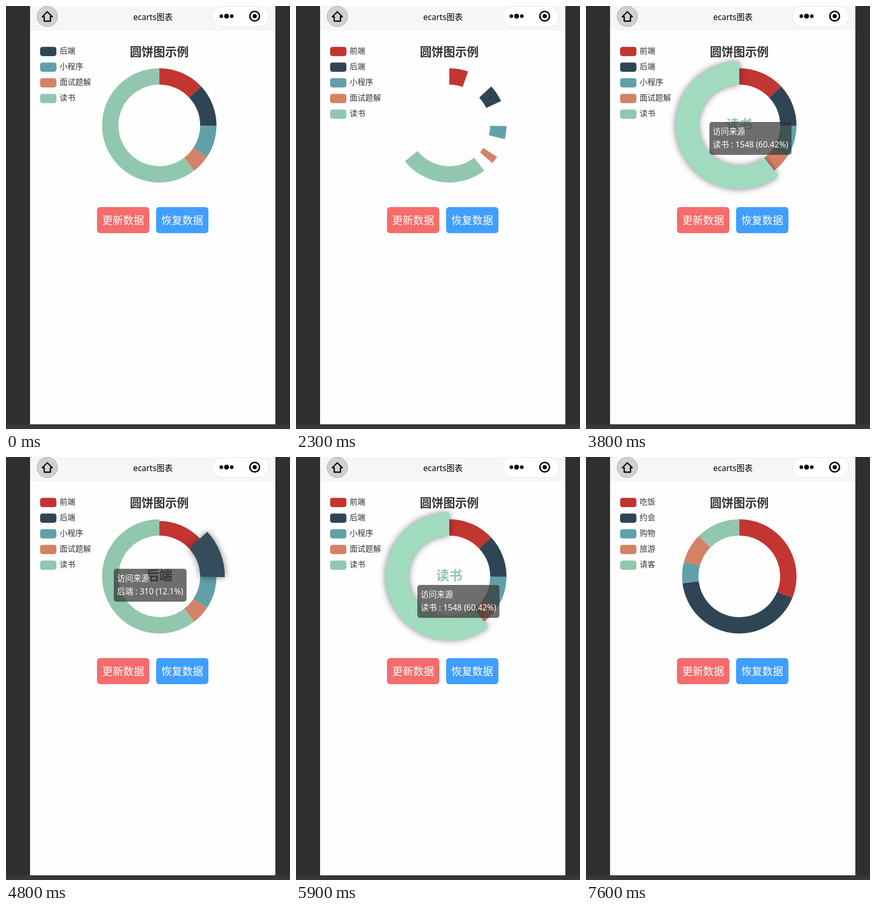
Animation of 543 by 810 pixels, one loop 8000 ms. Source, as an HTML page:

```html
<!DOCTYPE html>
<html lang="zh">
<head>
<meta charset="utf-8">
<title>圆饼图示例</title>
<style>
  html, body { margin: 0; width: 100%; height: 100%; overflow: hidden; background: #2f2f2f; }
  svg { display: block; }
  text { font-family: "Noto Sans", "Noto Sans CJK SC", "Noto Sans CJK", sans-serif; }
  .mid { text-anchor: middle; }
  .lit { filter: drop-shadow(0 0 6.25px rgba(0, 0, 0, .5)); }
</style>
</head>
<body>
<svg id="stage" width="543" height="810" viewBox="0 0 543 810">
  <rect width="543" height="810" fill="#2f2f2f"/>
  <rect y="801" width="543" height="9" fill="#383838"/>
  <rect x="46" width="469" height="801" fill="#fefefe"/>
  <rect x="46" width="469" height="47" fill="#f6f6f6"/>

  <circle cx="79" cy="20" r="19.5" fill="#d0d0d0" stroke="#a9a9a9"/>
  <path d="M69.5 20.5 L79 11 L88.5 20.5 H85 V29 H73 V20.5 Z" fill="none" stroke="#000" stroke-width="2.4" stroke-linejoin="round"/>
  <text class="mid" x="281" y="27" font-size="15.5">ecarts图表</text>
  <rect x="394.5" y=".5" width="108" height="39" rx="19.5" fill="#fff" stroke="#e4e4e4"/>
  <circle cx="411.7" cy="19.5" r="3.4"/>
  <circle cx="421.7" cy="19.5" r="4.7"/>
  <circle cx="431.7" cy="19.5" r="3.4"/>
  <circle cx="475.5" cy="19.5" r="9.2" fill="none" stroke="#000" stroke-width="2.8"/>
  <circle cx="475.5" cy="19.5" r="4"/>

  <text class="mid" x="293" y="95.5" font-size="22.5" font-weight="700" fill="#333">圆饼图示例</text>
  <g id="legend" font-size="15" fill="#333"></g>
  <g id="ring"></g>
  <text id="label" class="mid" x="293" y="236" font-size="25" font-weight="700"></text>
  <g id="tip" font-size="15.5" fill="#fff">
    <rect height="63" rx="5" fill="#323232" fill-opacity=".7"/>
    <text x="6.2" y="23.5">访问来源</text>
    <text x="6.2" y="48.5"></text>
  </g>

  <g class="mid" font-size="20" fill="#fff">
    <rect x="174" y="385" width="100" height="50" rx="6" fill="#f56c6c"/>
    <text x="224" y="418.3">更新数据</text>
    <rect x="287" y="385" width="100" height="50" rx="6" fill="#409eff"/>
    <text x="337" y="418.3">恢复数据</text>
  </g>
</svg>
<script>
const LOOP = 8000, STEP = 100, LAG = 48, EASE_MS = 300;
const CX = 293.1, CY = 228.6, INNER = 78.1, OUTER = 109.4, GROW = 12.5;
const COLORS = [[194, 53, 49], [47, 69, 84], [97, 160, 168], [212, 130, 101], [145, 199, 174]];

const study = { names: ['前端', '后端', '小程序', '面试题解', '读书'], values: [335, 310, 234, 135, 1548] };
const leisure = { names: ['吃饭', '约会', '购物', '旅游', '请客'], values: [112.2, 150.9, 21.8, 30.1, 45] };

// Data shown from a given time; firstRow drops leading legend rows.
const datasets = [
  { at: -LOOP, data: study, firstRow: 1 },
  { at: 500, data: leisure, firstRow: 0 },
  { at: 2300, data: study, firstRow: 0 },
  { at: 7300, data: leisure, firstRow: 0 }
];

// Highlighted slice and tooltip corner; "right" aligns the tooltip to the page edge.
const hovers = [
  { at: -LOOP, slice: -1 },
  { at: 3800, slice: 4, x: 236, y: 222, extra: 100 },
  { at: 4300, slice: 0, right: 515, y: 173 },
  { at: 4800, slice: 1, x: 206, y: 214 },
  { at: 5200, slice: 2, x: 208, y: 282 },
  { at: 5700, slice: 4, x: 232, y: 245 },
  { at: 7300, slice: -1 }
];

const $ = id => document.getElementById(id);
const rgb = (c, k = 1) => `rgb(${c.map(v => Math.round(v * k))})`;
const sum = list => list.reduce((a, b) => a + b, 0);
const lastIndex = (list, t) => list.filter(e => e.at <= t).length - 1;
const progress = (e, t) => Math.min(1, (t - e.at + LAG + (e.extra || 0)) / EASE_MS);
const cubicOut = k => 1 - (1 - k) ** 3;
const elasticOut = k => k >= 1 ? 1 : 2 ** (-10 * k) * Math.sin((k - .1) * 5 * Math.PI) + 1;

function add(parent, tag, attrs) {
  const el = document.createElementNS('http://www.w3.org/2000/svg', tag);
  for (const key in attrs) el.setAttribute(key, attrs[key]);
  return parent.appendChild(el);
}

function sector(a0, a1, r) {
  const p = (a, d) => `${(CX + d * Math.sin(a)).toFixed(2)} ${(CY - d * Math.cos(a)).toFixed(2)}`;
  const big = a1 - a0 > Math.PI ? 1 : 0;
  return `M${p(a0, r)}A${r} ${r} 0 ${big} 1 ${p(a1, r)}L${p(a1, INNER)}A${INNER} ${INNER} 0 ${big} 0 ${p(a0, INNER)}Z`;
}

function drawLegend({ data, firstRow }) {
  $('legend').replaceChildren();
  data.names.slice(firstRow).forEach((name, row) => {
    const y = 78.3 + row * 30;
    add($('legend'), 'rect', { x: 65.2, y, width: 31.2, height: 17.6, rx: 4.4, fill: rgb(COLORS[row + firstRow]) });
    add($('legend'), 'text', { x: 102.4, y: y + 13.1 }).textContent = name;
  });
}

function drawRing(data, grown, lit, previous, pop) {
  const total = sum(data.values);
  $('ring').replaceChildren();
  let start = 0, top = null;
  data.values.forEach((value, i) => {
    const sweep = value / total * 2 * Math.PI;
    const swell = i === lit ? pop : i === previous ? 1 - pop : 0;
    const path = add($('ring'), 'path', {
      d: sector(start, start + sweep * grown, OUTER + GROW * swell),
      fill: rgb(COLORS[i], i === lit ? 1.1 : 1)
    });
    if (i === lit) {
      path.setAttribute('class', 'lit');
      top = path;
    }
    start += sweep;
  });
  if (top) $('ring').append(top);
}

function drawTip(data, hover) {
  const shown = hover.slice >= 0;
  $('tip').style.display = $('label').style.display = shown ? '' : 'none';
  if (!shown) return;
  const name = data.names[hover.slice], value = data.values[hover.slice];
  const percent = +(value / sum(data.values) * 100).toFixed(2);
  const [box, , line] = $('tip').children;
  line.textContent = `${name} : ${value} (${percent}%)`;
  const width = line.getComputedTextLength() + 12.4;
  box.setAttribute('width', width);
  $('tip').setAttribute('transform', `translate(${hover.x ?? hover.right - width} ${hover.y})`);
  $('label').textContent = name;
  $('label').setAttribute('fill', rgb(COLORS[hover.slice]));
}

function draw(t) {
  const set = datasets[lastIndex(datasets, t)];
  const h = lastIndex(hovers, t), hover = hovers[h];
  const previous = hover.slice >= 0 ? hovers[h - 1].slice : -1;
  drawLegend(set);
  drawRing(set.data, cubicOut(progress(set, t)), hover.slice, previous, elasticOut(progress(hover, t)));
  drawTip(set.data, hover);
}

const begin = performance.now();
let shownStep = -1;
function tick() {
  const step = Math.floor((performance.now() - begin) % LOOP / STEP);
  if (step !== shownStep) draw((shownStep = step) * STEP);
  requestAnimationFrame(tick);
}
tick();
</script>
</body>
</html>
```
